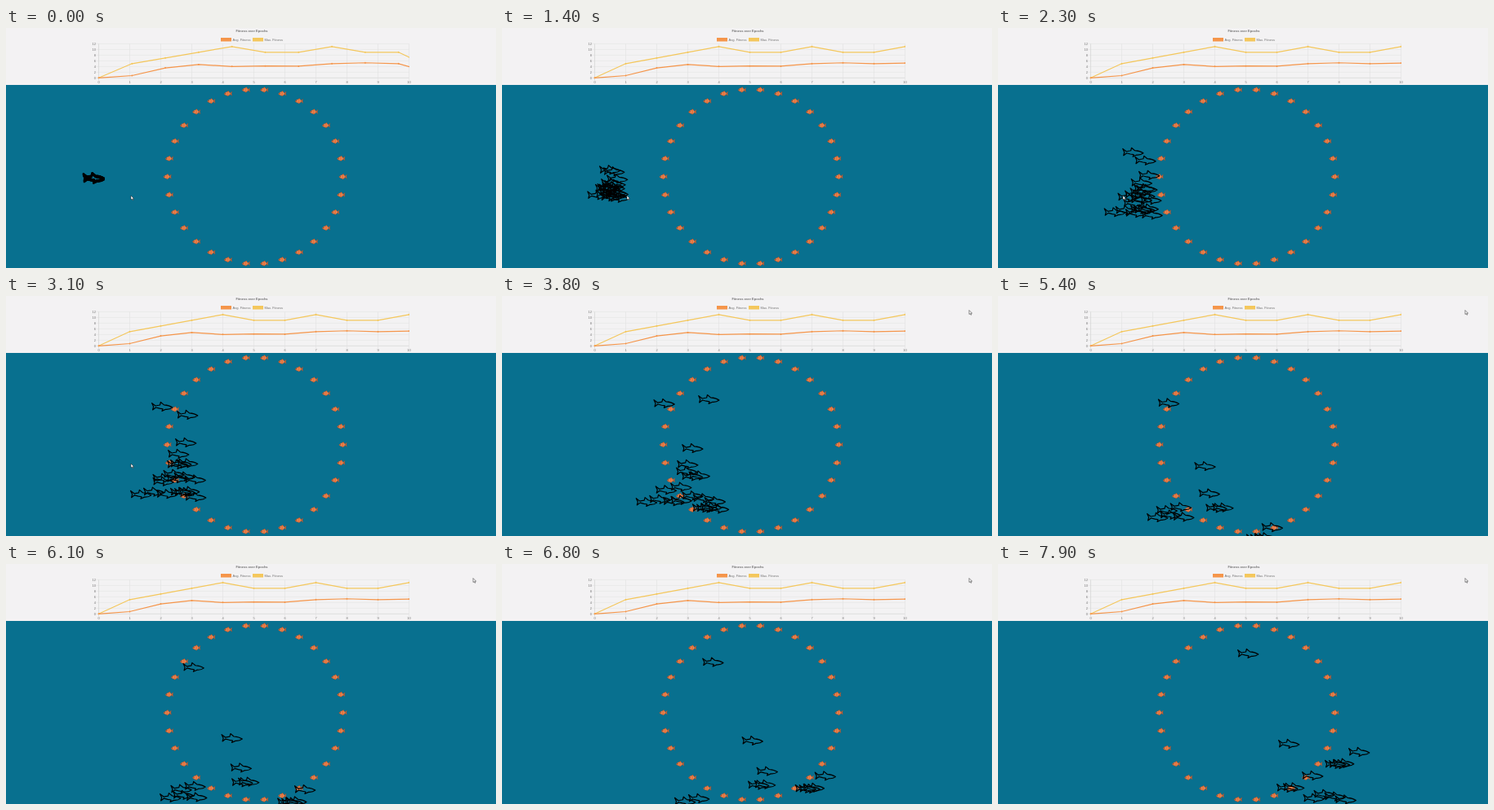
Write an HTML page that moves like this. It is 600x295 px and loops after 8 s.

```html
<!DOCTYPE html>
<html lang="en">
<head>
<meta charset="utf-8">
<title>Fitness over Epochs</title>
<style>
  html, body { margin: 0; width: 100%; height: 100%; overflow: hidden; background: #08708f; }
  svg { display: block; width: 100vw; height: 100vh; }
  text { font: 4px "Liberation Sans", Arial, sans-serif; fill: #707070; }
  .title { font-weight: bold; }
</style>
</head>
<body>
<svg viewBox="0 0 600 295">
  <defs>
    <clipPath id="plot"><rect x="112.5" y="18" width="381.5" height="45"/></clipPath>
    <path id="shark" fill="none" stroke="#000" stroke-width="1.2" stroke-linejoin="round"
      d="M12.8 1C10 -1 6.5 -1.9 2.5 -2.1L-1.6 -5.5L-2.5 -2L-8 -1L-12.4 -4.4L-10.4 0L-11.4 3.9L-7.6 1L-3 2.2L1 2.9L0 5.4L4.6 3.3Q9.5 3.7 12.8 1Z"/>
    <g id="fish" stroke="#8a4a34" stroke-width=".4">
      <path d="M2 0L4.8 -2.6L4.3 0L4.8 2.6Z" fill="#dd6c38"/>
      <path d="M-4.8 .3Q-3 -2 -.8 -2.4L.6 -3.4L1.6 -2Q2.6 -1.2 3.2 0Q2.4 1.7 1.3 2.2L0 3.2L-1 2.5Q-3.2 2.2 -4.8 .3Z" fill="#e87439"/>
      <path d="M-1.8 -1.7V1.8M1.3 -1.5V1.6" stroke="#dba58a" stroke-width=".6"/>
      <circle cx="-3" cy="-.2" r=".35" fill="#222"/>
    </g>
  </defs>
  <rect width="600" height="70" fill="#f3f2f3"/>
  <rect y="70" width="600" height="225" fill="#08708f"/>
  <g id="chart">
    <text class="title" x="301" y="5" text-anchor="middle">Fitness over Epochs</text>
    <rect x="263" y="12" width="13" height="4.5" fill="#f5954a"/>
    <text x="277.6" y="15.7">Avg. Fitness</text>
    <rect x="302" y="12" width="13" height="4.5" fill="#f4c75c"/>
    <text x="316.4" y="15.7">Max. Fitness</text>
  </g>
  <g id="lines" clip-path="url(#plot)"></g>
  <g id="sea"></g>
  <path id="cursor" d="M0 0V5L1.2 4L2.1 5.8L2.9 5.4L2.1 3.7H3.6Z" fill="#fff" stroke="#222" stroke-width=".5"/>
</svg>
<script>
const LOOP = 8000, STEP = 100;
const $ = id => document.getElementById(id);
const mix = (a, b, u) => a + (b - a) * u;
const clamp = u => Math.min(1, Math.max(0, u));
const smooth = u => u * u * (3 - 2 * u);

function add(parent, tag, attrs, text) {
  const el = document.createElementNS("http://www.w3.org/2000/svg", tag);
  for (const key in attrs) el.setAttribute(key, attrs[key]);
  if (text !== undefined) el.textContent = text;
  return parent.appendChild(el);
}
const place = (el, [x, y]) => el.setAttribute("transform", `translate(${x} ${y})`);

let seed = 7;
function random() {
  seed = seed * 16807 % 2147483647;
  return seed / 2147483647;
}

// Chart
const LEFT = 113.5, WIDTH = 380, EPOCHS = 10;
const yOf = value => 61.3 - value * 3.5;
const grid = (x1, y1, x2, y2, zero) =>
  add($("chart"), "line", { x1, y1, x2, y2, stroke: zero ? "#cfcfcf" : "#e1e1e1", "stroke-width": .6 });

for (let v = 0; v <= 12; v += 2) {
  grid(LEFT - 3, yOf(v), LEFT + WIDTH, yOf(v), v === 0);
  add($("chart"), "text", { x: 110, y: yOf(v) + 1.4, "text-anchor": "end" }, v);
}
for (let i = 0; i <= EPOCHS; i++) {
  const x = LEFT + i * WIDTH / EPOCHS;
  grid(x, yOf(12), x, yOf(0) + 3, i === 0);
  add($("chart"), "text", { x, y: 68.2, "text-anchor": "middle" }, i);
}

const series = [
  { color: "#f4c75c", values: [0, 5, 7, 9, 11, 9, 9, 11, 9, 9, 11] },
  { color: "#f5954a", values: [0, .8, 3.5, 4.7, 4, 4.2, 4.1, 5, 5.3, 5, 5.2] }
];
for (const s of series) {
  s.line = add($("lines"), "path", { fill: "none", stroke: s.color, "stroke-width": 1.2 });
  s.dots = s.values.map(() => add($("lines"), "circle", { r: .95, fill: s.color }));
}

// The newest epoch rises from zero while the others move closer together.
function drawChart(t) {
  const p = 1 - (1 - clamp((t + 90) / 1000)) ** 4;
  const gap = WIDTH / mix(EPOCHS - 1, EPOCHS, p);
  for (const s of series) {
    const points = s.values.map((v, i) => [LEFT + i * gap, yOf(i === EPOCHS ? v * p : v)]);
    s.line.setAttribute("d", "M" + points.join("L"));
    points.forEach((point, i) => place(s.dots[i], point));
  }
}

// Smooth motion through [time, x, y] keys, starting at rest.
function follow(keys, t) {
  const last = keys.length - 1;
  let i = 0;
  while (i < last - 1 && t >= keys[i + 1][0]) i++;
  const span = keys[i + 1][0] - keys[i][0], u = clamp((t - keys[i][0]) / span);
  const tangent = (k, d) => {
    if (k === 0) return 0;
    const a = keys[k - 1], b = keys[Math.min(k + 1, last)];
    return (b[d] - a[d]) / (b[0] - a[0]);
  };
  return [1, 2].map(d => mix(keys[i][d], keys[i + 1][d], smooth(u))
    + span * u * (1 - u) * ((1 - u) * tangent(i, d) - u * tangent(i + 1, d)));
}

// Prey
for (let i = 0; i < 30; i++) {
  const a = i * Math.PI / 15;
  place(add($("sea"), "use", { href: "#fish" }), [305 + 107.5 * Math.cos(a), 182.7 + 107.3 * Math.sin(a)]);
}

// Packs leave the den together and pass three evenly timed waypoints.
const DEN = [107, 184.5], SPREAD_OUT = 3100, LEG = 2400;
const packs = [
  { path: [[191, 136], [211, 131], [306, 110]] },
  { path: [[222, 146], [325, 75]], until: 5000 },
  { path: [[220, 180], [256, 210], [356, 221]] },
  { path: [[211, 194], [262, 244], [385, 260]] },
  { path: [[232, 247], [340, 284], [442, 231]] },
  { path: [[210, 207], [250, 240]], until: 4200 },
  { path: [[218, 207], [274, 263], [358, 276]], size: 2, gap: 8 },
  { path: [[201, 224], [216, 261], [248, 312]], size: 2, gap: 17 },
  { path: [[181, 246], [212, 276], [228, 338]], size: 3, gap: 16 },
  { path: [[219, 241], [326, 298], [418, 246]], size: 3, gap: 5 },
  { path: [[212, 220], [305, 311], [406, 284]], size: 4, gap: 13 }
];

const sharks = packs.flatMap(({ path, size = 1, gap = 0, until = LOOP }) =>
  Array.from({ length: size }, (_, k) => {
    const dx = (k - (size - 1) / 2) * gap, dy = (random() - .5) * gap;
    const points = path.map(([x, y]) => [x + dx, y + dy]);
    const [x, y] = points[0];
    return {
      until,
      el: add($("sea"), "use", { href: "#shark" }),
      keys: [
        [0, DEN[0] + random() - .5, DEN[1] + 3 * (random() - .5)],
        [1400, mix(DEN[0], x, .32) - 9 * random(), mix(DEN[1], y, .3) + 6 * random()],
        ...points.map((point, i) => [SPREAD_OUT + i * LEG, ...point])
      ]
    };
  }));

function drawCursor(t) {
  const u = clamp((t - 3100) / 650);
  place($("cursor"), [mix(153, 572, smooth(u)), mix(206, 17.5, 1 - (1 - u) ** 2)]);
}

function draw(t) {
  drawChart(t);
  for (const { el, keys, until } of sharks) {
    place(el, follow(keys, t));
    el.setAttribute("visibility", t < until ? "visible" : "hidden");
  }
  drawCursor(t);
}

const start = performance.now();
function tick() {
  const t = (performance.now() - start) % LOOP;
  draw(Math.floor(t / STEP) * STEP);
  requestAnimationFrame(tick);
}
tick();
</script>
</body>
</html>
```
